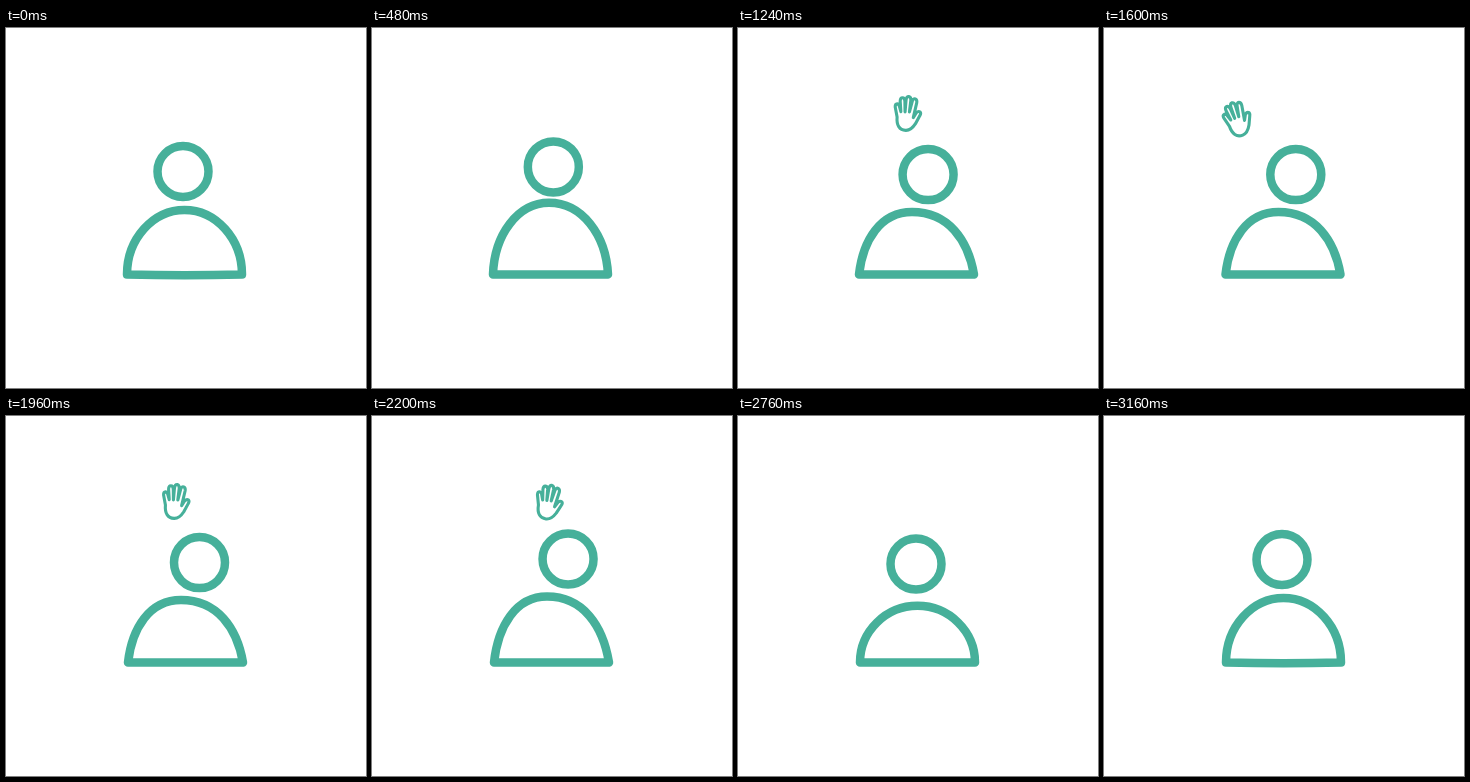
Write an HTML page that moves like this. It is 360 px wide and 360 px high and loops after 4080 ms.

```html
<!DOCTYPE html>
<html lang="en">
<head>
<meta charset="utf-8">
<title>Waving figure</title>
<style>
html, body { margin: 0; width: 100%; height: 100%; overflow: hidden; background: #fff; }
svg { display: block; width: 100vw; height: 100vh; fill: none; stroke: #46b09a; stroke-width: 8.5; stroke-linecap: round; stroke-linejoin: round; }
</style>
</head>
<body>
<svg viewBox="0 0 360 360">
  <path id="body"/>
  <circle id="head" r="25.5"/>
  <path id="hand" stroke-width="3.1" d="M-10.6 4L-12.8 -6Q-13 -9 -11 -9.2Q-9.2 -9 -8.7 -7L-7 -1.5L-8 -12Q-8 -15.5 -5.8 -15.5Q-3.6 -15.5 -3.3 -12L-2.8 -1.5L-2.2 -13Q-2 -17 .5 -17Q2.8 -16.5 2.6 -13L1.6 -1.5L4 -12Q5 -15.5 7 -14.8Q9 -14 8.6 -11L5.6 4L8.5 -1Q10.5 -3 12.3 -1.8Q13.5 -.5 12 2L8 10C5 15 2 17 -1.5 17C-8 17 -11 12 -10.6 4Z"/>
</svg>
<script>
const LOOP = 4080, STEP = 40, TAU = 2 * Math.PI;
const [body, head, hand] = ['body', 'head', 'hand'].map(id => document.getElementById(id));

const clamp = (v, lo, hi) => Math.min(hi, Math.max(lo, v));
const line = (t, from, to) => clamp((t - from) / (to - from), 0, 1);
const ramp = (t, from, to) => {
  const p = line(t, from, to);
  return p * p * (3 - 2 * p);
};

function drawFigure(t) {
  const jump = ramp(t, 1960, 2400), land = ramp(t, 2400, 2760), settle = ramp(t, 2760, 3160);
  const lean = ramp(t, 160, 1000) - land;
  const shift = ramp(t, 1240, 1960) - 1;

  // Two bounces, a hold, then a hop back to rest
  const drop = 4.6 * Math.sin(TAU * Math.min(t, 800) / 640)
    - 1.5 * ramp(t, 800, 1200) - 6.2 * jump + 7.6 * land - 4.5 * settle;
  const x = 177 + 11 * ramp(t, 240, 800) + 5.5 * line(t, 800, 1960) + 4.5 * jump - 20 * land;
  head.setAttribute('transform', `translate(${x} ${143.5 + drop})`);

  const left = 122 + shift, right = 237 + shift, base = 246.5;
  const mid = (left + right) / 2, peak = mid - 4.5 * lean;
  const top = 182 + drop * (1.75 - .75 * lean) - lean;
  const side = base - .55 * (base - top);
  const sag = 1.5 * (1 - ramp(t, 0, 240) + settle);
  body.setAttribute('d', `M${left} ${base}
    C${left + 4 * lean} ${side} ${peak - 31.5} ${top} ${peak} ${top}
    C${peak + 31.5 + 5 * lean} ${top} ${right - 6 * lean} ${side} ${right} ${base}
    Q${mid} ${base + sag} ${left} ${base}Z`);
}

function drawHand(t) {
  // The arm swings about an elbow; the wrist turns as the hand leaves
  const wave = -10 - 12 * Math.cos(TAU * (clamp(t, 860, 1940) - 860) / 720);
  const arm = wave - 30 * (1 - ramp(t, 560, 800)) + 8 * ramp(t, 1940, 2400);
  const twist = 40 * ramp(t, 2240, 2560);
  const size = ramp(t, 560, 720) - ramp(t, 2340, 2550);
  hand.setAttribute('transform', `translate(164.5 174) rotate(${arm})
    translate(2.5 -98.7) rotate(${twist}) scale(${size}) translate(0 10)`);
}

function draw() {
  const t = Math.floor(performance.now() % LOOP / STEP) * STEP;
  drawFigure(t);
  drawHand(t);
  requestAnimationFrame(draw);
}
draw();
</script>
</body>
</html>
```
